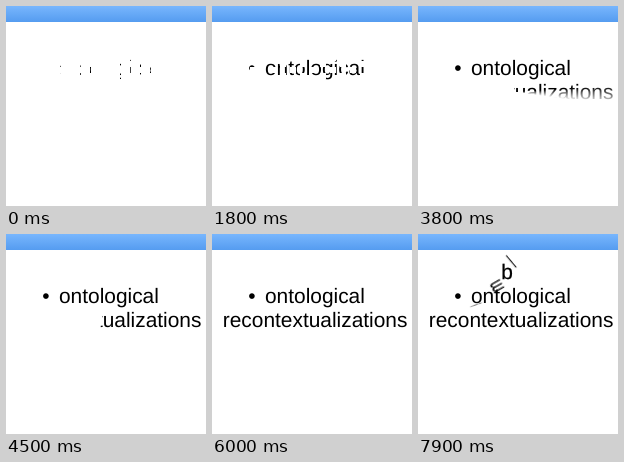
Write an HTML page that moves like this. It is 200x200 px and loops after 8000 ms.

```html
<!DOCTYPE html>
<html lang="en">
<head>
<meta charset="utf-8">
<title>Slide text effects</title>
<style>
  @property --w { syntax: "<length>"; inherits: false; initial-value: 0px; }
  @property --a { syntax: "<angle>"; inherits: false; initial-value: 0deg; }

  html, body { margin: 0; width: 100%; height: 100%; overflow: hidden; background: #fff; }

  .stage { position: relative; width: 200px; height: 200px; overflow: hidden; background: #fff; }
  .bar {
    height: 16px;
    background: linear-gradient(#78b6fd, #559cf0);
  }
  .layer, svg { position: absolute; left: 0; top: 0; width: 200px; height: 200px; }
  text {
    font: 20.9px "Liberation Sans", Arial, sans-serif;
    fill: #000;
    text-rendering: geometricPrecision;
  }

  /* Checkerboard: cells open left to right, every other row shifted half a period */
  .checker {
    --cell: linear-gradient(90deg, #000 var(--w), transparent 0);
    mask-image: var(--cell), var(--cell), var(--cell), var(--cell), var(--cell);
    mask-size: 20px 6px;
    mask-repeat: repeat-x;
    mask-position: 4px 49px, 14px 55px, 4px 61px, 14px 67px, 4px 73px;
    animation: open 8s infinite;
  }
  @keyframes open {
    0% { --w: 1px; animation-timing-function: steps(27); }
    33.75%, 100% { --w: 20px; }
  }

  /* Clockwise wheel with a soft edge */
  .wheel {
    mask-image: conic-gradient(at 96px 86px,
      #000 calc(var(--a) - 6deg), transparent calc(var(--a) + 6deg));
    animation: sweep 8s infinite;
  }
  @keyframes sweep {
    0%, 38.75% { --a: -6deg; animation-timing-function: steps(27); }
    72.5%, 100% { --a: 372deg; }
  }

  /* Letters swing in one after another, turning as they come */
  .fly text {
    text-anchor: middle;
    stroke: #000;
    stroke-width: .25px;
    opacity: 0;
    animation: 8s linear infinite;
  }
  .fly .dot { animation-name: dot; }
  .fly .b { animation-name: b; }
  .fly .l { animation-name: l; }
  .fly .m { animation-name: m; }
  .fly .e { animation-name: e; }

  @keyframes dot {
    0%, 82.49% { opacity: 0; transform: translate(35px, 80px) rotate(-60deg) scaleX(.3); }
    82.5% { opacity: 1; transform: translate(35px, 80px) rotate(-60deg) scaleX(.3); }
    87.5% { opacity: 1; transform: translate(55px, 29px) rotate(30deg) scaleX(.75); }
    92.49% { opacity: 1; transform: translate(92px, -8px); }
    92.5%, 100% { opacity: 0; transform: translate(92px, -8px); }
  }
  @keyframes b {
    0%, 83.74% { opacity: 0; transform: translate(40px, 72px) rotate(-110deg) scaleX(.1); }
    83.75% { opacity: 1; transform: translate(40px, 72px) rotate(-110deg) scaleX(.1); }
    87.5% { opacity: 1; transform: translate(62.5px, 23.5px) rotate(-40deg) scaleX(.12); }
    93.125% { opacity: 1; transform: translate(84px, 25px) rotate(-25deg) scaleX(.6); }
    98.75% { opacity: 1; transform: translate(89px, 37px) rotate(0deg) scaleX(1); }
    100% { opacity: 1; transform: translate(88px, 41px) rotate(0deg) scaleX(1); }
  }
  @keyframes l {
    0%, 93.74% { opacity: 0; transform: translate(57px, 71px) rotate(-110deg) scaleX(.1); }
    93.75% { opacity: 1; transform: translate(57px, 71px) rotate(-110deg) scaleX(.1); }
    96.25% { opacity: 1; transform: translate(78px, 52px) rotate(-115deg) scaleX(.7); }
    98.75% { opacity: 1; transform: translate(93px, 27px) rotate(-40deg) scaleX(.5); }
    100% { opacity: 1; transform: translate(95px, 29px) rotate(-25deg) scaleX(.7); }
  }
  @keyframes m {
    0%, 96.24% { opacity: 0; transform: translate(57px, 71px) rotate(-110deg) scaleX(.1); }
    96.25% { opacity: 1; transform: translate(57px, 71px) rotate(-110deg) scaleX(.1); }
    98.75% { opacity: 1; transform: translate(78.5px, 52.5px) rotate(-120deg) scaleX(.65); }
    100% { opacity: 1; transform: translate(87px, 39px) rotate(-80deg) scaleX(.65); }
  }
  @keyframes e {
    0%, 98.74% { opacity: 0; transform: translate(57px, 71px) rotate(-110deg) scaleX(.1); }
    98.75% { opacity: .8; transform: translate(57px, 71px) rotate(-110deg) scaleX(.1); }
    100% { opacity: 1; transform: translate(67px, 62px) rotate(-115deg) scaleX(.4); }
  }
</style>
</head>
<body>
<div class="stage">
  <div class="bar"></div>
  <div class="layer checker">
    <svg viewBox="0 0 200 200"><text x="36.3" y="68.5">•</text><text x="53" y="68.5">ontological</text></svg>
  </div>
  <div class="layer wheel">
    <svg viewBox="0 0 200 200"><text x="-6.4" y="93">•</text><text x="10.8" y="93">recontextualizations</text></svg>
  </div>
  <svg class="fly" viewBox="0 0 200 200">
    <text class="dot" y="7.8">•</text>
    <text class="b" y="7.6">b</text>
    <text class="l" y="7.6">l</text>
    <text class="m" y="5.5">m</text>
    <text class="e" y="5.5">e</text>
  </svg>
</div>
</body>
</html>
```
